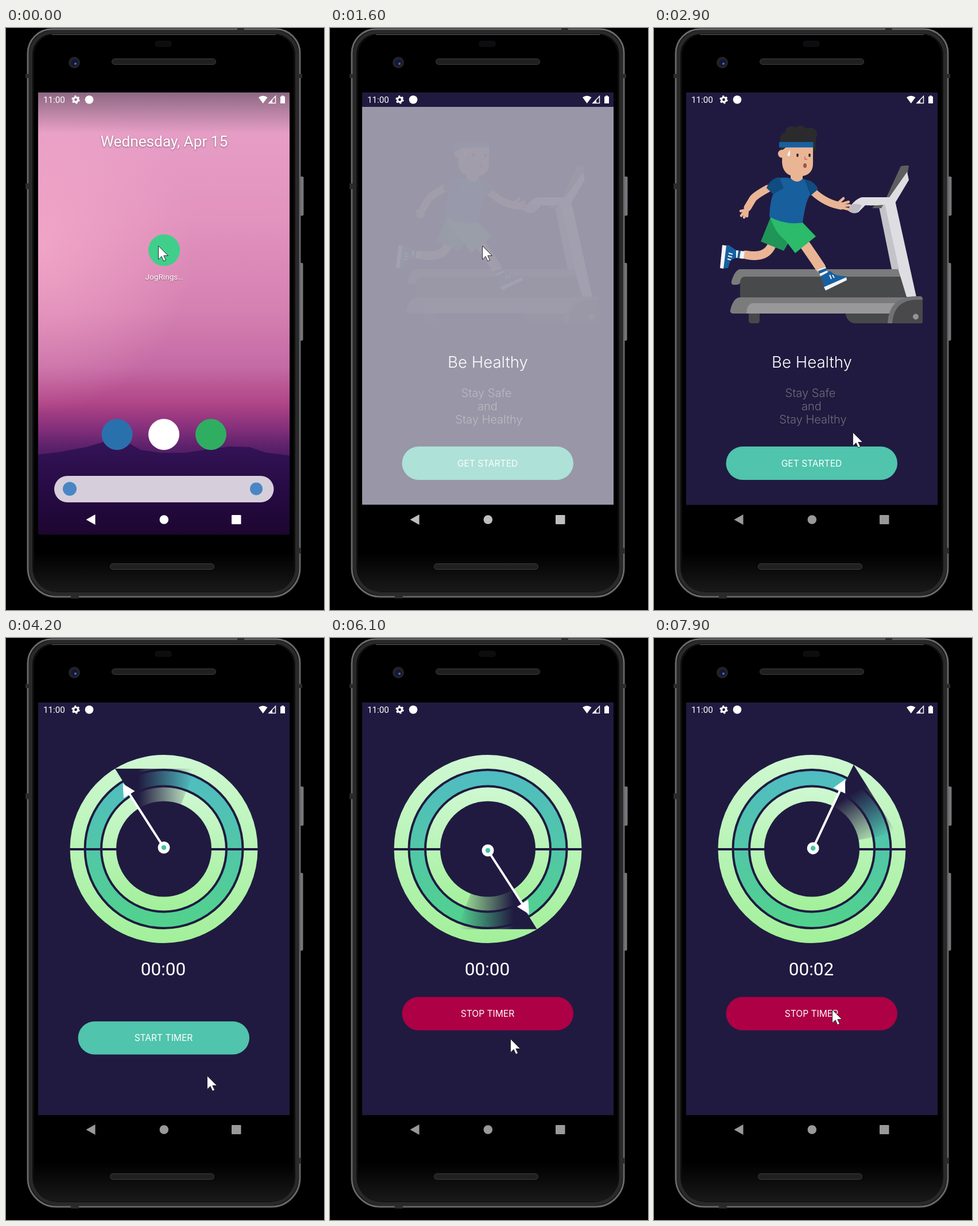
An HTML page that plays this animation: 554x1011 px, repeating every 8000 ms.

```html
<!DOCTYPE html>
<html lang="en">
<head>
<meta charset="utf-8">
<title>Workout timer</title>
<style>
html, body { margin: 0; width: 100%; height: 100%; overflow: hidden; background: #000; }
svg { display: block; width: 554px; height: 1011px; }
text { fill: #fff; font-family: Roboto, sans-serif; }
.mid { text-anchor: middle; }
.inter { font-family: Inter, sans-serif; text-anchor: middle; }
.label { font-size: 15.6px; font-weight: 400; }
.sub { font-size: 20px; font-weight: 300; fill: #716c77; }
.skin { fill: #eab595; }
.limb { fill: none; stroke: #eab595; stroke-linecap: round; stroke-linejoin: round; }
.navy { fill: #201a40; }
</style>
</head>
<body>
<svg viewBox="0 0 554 1011">
  <defs>
    <linearGradient id="sky" gradientUnits="userSpaceOnUse" x1="0" y1="112" x2="0" y2="740">
      <stop offset="0" stop-color="#e8a2c9"/><stop offset=".35" stop-color="#e293be"/>
      <stop offset=".6" stop-color="#d581b2"/><stop offset=".76" stop-color="#c46aa4"/>
      <stop offset=".86" stop-color="#b04587"/><stop offset=".93" stop-color="#842f7b"/>
      <stop offset=".98" stop-color="#5c216b"/><stop offset="1" stop-color="#531e66"/>
    </linearGradient>
    <radialGradient id="glow">
      <stop offset="0" stop-color="#f8aecb" stop-opacity=".7"/><stop offset="1" stop-color="#f8aecb" stop-opacity="0"/>
    </radialGradient>
    <linearGradient id="hills" x2="0" y2="1">
      <stop offset="0" stop-color="#351458"/><stop offset=".5" stop-color="#270b45"/><stop offset="1" stop-color="#1d0631"/>
    </linearGradient>
    <linearGradient id="shade" x2="0" y2="1">
      <stop offset="0" stop-color="#403848" stop-opacity=".55"/><stop offset="1" stop-color="#403848" stop-opacity="0"/>
    </linearGradient>
    <linearGradient id="mint" x2="0" y2="1"><stop stop-color="#cff8d2"/><stop offset="1" stop-color="#a2f09a"/></linearGradient>
    <linearGradient id="teal" x2="0" y2="1"><stop stop-color="#50bcc2"/><stop offset="1" stop-color="#52d28c"/></linearGradient>
    <linearGradient id="trail" gradientUnits="userSpaceOnUse" x1="190" y1="0" x2="325" y2="0">
      <stop offset=".3" stop-color="#201a40"/><stop offset="1" stop-color="#201a40" stop-opacity="0"/>
    </linearGradient>
    <linearGradient id="chin" x2="0" y2="1">
      <stop offset=".93" stop-color="#000"/><stop offset="1" stop-color="#191919"/>
    </linearGradient>
    <clipPath id="screen"><rect x="56" y="112" width="438" height="768"/></clipPath>
    <clipPath id="reveal"><rect id="revealBox" x="56" width="438" height="800"/></clipPath>
    <clipPath id="windowClip"><rect id="windowShape"/></clipPath>
  </defs>

  <rect width="554" height="1011"/>

  <!-- Phone body -->
  <g fill="#77777a">
    <rect x="511" y="258" width="7.5" height="68" rx="2"/>
    <rect x="511" y="408" width="6.5" height="135" rx="2"/>
  </g>
  <path d="M80 2H470A42 42 0 0 1 512 44V938A50 50 0 0 1 462 988H88A50 50 0 0 1 38 938V44A42 42 0 0 1 80 2Z"
    fill="#0d0d0e" stroke="#69696b" stroke-width="3"/>
  <path d="M82 7H468A39 39 0 0 1 507 46V936A47 47 0 0 1 460 983H90A47 47 0 0 1 43 936V46A39 39 0 0 1 82 7Z"
    fill="none" stroke="#29292a" stroke-width="6"/>
  <rect x="49" y="11" width="452" height="968" rx="36" fill="url(#chin)"/>
  <path d="M80 11.5H470" stroke="#666" fill="none"/>
  <path d="M37 80v7M37 270v10M513 80v7M510 903v10M403 3h12M113 988h14" stroke="#2b2b2c" stroke-width="6"/>
  <g fill="#202021" stroke="#3d3d3e">
    <rect x="184.5" y="53.5" width="181" height="10" rx="5"/>
    <rect x="181.5" y="930.5" width="181" height="10" rx="5"/>
  </g>
  <rect x="259" y="22" width="30" height="11" rx="5" fill="#0d0d10"/>
  <circle cx="119" cy="60" r="10" fill="#232326"/>
  <circle cx="119.5" cy="60.5" r="6" fill="#11183a"/>
  <circle cx="121" cy="62" r="2" fill="#5668a8"/>

  <g clip-path="url(#screen)">
    <rect x="56" y="111" width="439" height="769" fill="url(#sky)"/>
    <ellipse cx="56" cy="380" rx="270" ry="290" fill="url(#glow)"/>
    <path d="M56 741L90 737 140 728 180 716 210 719 235 733 270 738 310 738 350 732 390 727 425 728 450 737 495 743V880H56Z" fill="url(#hills)"/>

    <g id="home">
      <rect x="56" y="111" width="439" height="72" fill="url(#shade)"/>
      <text class="mid" x="275.5" y="206" font-size="26.2" style="text-shadow:0 1px 3px #0006">Wednesday, Apr 15</text>
      <circle cx="275.5" cy="386" r="27.5" fill="#3fcf8a"/>
      <text class="mid" x="275.5" y="437" font-size="13.6" style="text-shadow:0 1px 2px #0006">JogRings…</text>
      <circle cx="193.5" cy="706" r="27" fill="#2971ac"/>
      <circle cx="275" cy="706" r="27" fill="#fff"/>
      <circle cx="357" cy="706" r="27" fill="#2fae62"/>
      <rect x="84" y="778" width="382.5" height="46" rx="23" fill="#d6cfdb"/>
      <circle cx="111" cy="800.5" r="12" fill="#4a86c5"/>
      <circle cx="436" cy="800.5" r="11" fill="#4a86c5"/>
    </g>

    <g id="window" clip-path="url(#windowClip)">
      <rect x="56" y="111" width="439" height="769" fill="#fafafa"/>
      <rect id="windowTop" class="navy" x="56" width="439"/>
      <rect id="windowNav" x="56" width="439"/>
    </g>

    <g id="intro">
      <rect class="navy" x="56" y="111" width="439" height="717.5"/>
      <g id="runner">
        <!-- Treadmill -->
        <path d="M150 419H432V433H157Q152 433 151 440 150 446 143 446H139Q134 446 135 440 141 420 150 419Z" fill="#7b7b7c"/>
        <path d="M157 432H445V470H150V441Q151 433 157 432Z" fill="#48494b"/>
        <path d="M391 306L420 300 457 467H440Z" fill="#dedee2"/>
        <path d="M391 306L402 305 427 419H414Z" fill="#c3c3c9"/>
        <path d="M165 494H184V508Q184 513 179 513H170Q165 513 165 508Z" fill="#47484a"/>
        <path d="M333 494H430V513H350Q336 512 333 494Z" fill="#47484a"/>
        <path d="M149 468H440V496H138Q132 496 133 490 138 469 149 468Z" fill="#7b7b7c"/>
        <path d="M171 478H430V496H161Q162 480 171 478Z" fill="#98989a"/>
        <path d="M407 513Q409 468 453 466H463Q468 466 468 471V509Q468 513 464 513Z" fill="#717173"/>
        <path d="M415 513Q418 472 458 472H468V509Q468 513 464 513Z" fill="#49494b"/>
        <circle cx="456" cy="501.5" r="5" fill="#949496"/>
        <path d="M380 313L386 306H400L396 313ZM430 240L436 239H444L442 252 413 300 405 294Z" fill="#5e5e60"/>
        <path d="M337 316Q350 297 362 294H410L441 250 444 264 420 304Q400 309 368 308L356 320Q346 324 337 316Z" fill="#dedee2"/>
        <path d="M337 316L346 306Q358 304 362 309L354 321Q345 324 337 316Z" fill="#bcbcc2"/>
        <!-- Legs -->
        <path class="limb" d="M205 378Q194 401 160 394" stroke-width="15"/>
        <path d="M142 386L158 388 156 401 141 399Z" fill="#f4f4f6"/>
        <path d="M147 387h4l-2 13h-4Z" fill="#17609f"/>
        <path d="M123 378L130 377 143 386 143 399 133 404 129 417 117 418Z" fill="#17609f"/>
        <path d="M119 377L126 378 121 418 115 417Z" fill="#f4f4f6"/>
        <path d="M130 391l7 2M129 396l7 2M128 401l6 2" stroke="#f4f4f6" stroke-width="2"/>
        <path d="M203 329L186 371 226 387 242 360Z" fill="#1f9657"/>
        <path class="limb" d="M264 378Q278 398 290 416" stroke-width="18"/>
        <path d="M285 420L299 415 303 425 290 431Z" fill="#f4f4f6"/>
        <path d="M286 422l14-5 2 4-14 6Z" fill="#17609f"/>
        <path d="M291 431L307 422Q316 432 334 431L336 437 298 455Z" fill="#17609f"/>
        <path d="M296 450L335 433 336 438 299 456Z" fill="#f4f4f6"/>
        <path d="M306 429l3 7M311 429l3 5" stroke="#f4f4f6" stroke-width="2"/>
        <path d="M202 327Q230 341 258 337L282 362 246 391 229 369Q210 355 202 327Z" fill="#2bbb6b"/>
        <!-- Arms and torso -->
        <path class="limb" d="M198 279Q176 291 172 297L163 312" stroke-width="13"/>
        <path class="limb" d="M160 316L151 318M159 317L152 326M160 318L157 329M163 317L162 327" stroke-width="4.5"/>
        <path class="limb" d="M278 285Q300 305 326 309" stroke-width="13"/>
        <path class="limb" d="M322 303L330 296M326 306L339 302M328 309L341 308M327 312L339 315" stroke-width="4.5"/>
        <path d="M205 266Q222 256 240 262 250 268 260 262 278 268 284 278L272 290Q264 300 259 338 230 343 201 328 202 300 208 288Z" fill="#185f9e"/>
        <path d="M196 278Q202 262 218 259L226 278 208 289ZM262 263Q279 265 286 280L273 291Z" fill="#104c80"/>
        <path class="skin" d="M238 248H259V262Q249 272 238 261Z"/>
        <!-- Head -->
        <g fill="#2b2b2d">
          <circle cx="239" cy="181" r="10.5"/><circle cx="255" cy="182" r="12.5"/><circle cx="272" cy="185" r="12"/>
          <circle cx="229" cy="191" r="9"/><rect x="220" y="188" width="62" height="26" rx="4"/>
        </g>
        <path class="skin" d="M224 212L230 207H277V235Q277 258 250 258 224 258 223 232Z"/>
        <circle class="skin" cx="223" cy="218.5" r="7"/>
        <rect x="218" y="198" width="59.5" height="9.5" fill="#17609f"/>
        <path d="M237 212q-6 7-4 10 3 2 4-2Z" fill="#f4f6fa"/>
        <ellipse cx="250" cy="221" rx="1.8" ry="3" fill="#26262a"/>
        <ellipse cx="271" cy="221" rx="1.8" ry="3" fill="#26262a"/>
        <path d="M263 223v5h4" fill="none" stroke="#d37b72" stroke-width="2"/>
        <ellipse cx="263" cy="239" rx="3" ry="4" fill="#9c544c"/>
      </g>
      <text class="inter" x="275" y="590" font-size="27.6" font-weight="300">Be Healthy</text>
      <text class="inter sub" x="272.5" y="641">Stay Safe</text>
      <text class="inter sub" x="274.5" y="664">and</text>
      <text class="inter sub" x="277" y="687">Stay Healthy</text>
      <rect x="125.5" y="727" width="298.5" height="58" rx="29" fill="#50c4ac"/>
      <text class="inter label" x="274.5" y="762">GET STARTED</text>
    </g>

    <g clip-path="url(#reveal)">
      <rect class="navy" x="56" y="111" width="439" height="717.5"/>
      <g id="timer">
        <circle cx="275" cy="366.5" r="163.5" fill="url(#mint)"/>
        <circle class="navy" cx="275" cy="366.5" r="139.5"/>
        <circle cx="275" cy="366.5" r="135.5" fill="url(#teal)"/>
        <circle class="navy" cx="275" cy="366.5" r="111"/>
        <circle cx="275" cy="366.5" r="107" fill="url(#mint)"/>
        <circle class="navy" cx="275" cy="366.5" r="83"/>
        <rect class="navy" x="110" y="365" width="330" height="4"/>
        <g id="hand">
          <path d="M190 227H330L275 364Z" fill="url(#trail)"/>
          <path d="M275 364L212 266" stroke="#fff" stroke-width="4"/>
          <path d="M203.5 253L224.5 266 205 278Z" fill="#fff"/>
          <circle cx="275" cy="364" r="10.5" fill="#fff"/>
          <circle cx="275" cy="364" r="4.3" fill="#45c2a8"/>
        </g>
        <text id="clock" class="mid" x="274" y="586" font-size="31.5">00:00</text>
        <g id="start">
          <rect x="125.5" y="666" width="298.5" height="57.5" rx="28.75" fill="#50c4ac"/>
          <text class="inter label" x="274.5" y="700">START TIMER</text>
        </g>
        <g id="stop">
          <rect x="125.5" y="623.5" width="298.5" height="58" rx="29" fill="#ae0045"/>
          <text class="inter label" x="274.5" y="658">STOP TIMER</text>
        </g>
      </g>
    </g>

    <!-- Status bar -->
    <text x="65" y="130" font-size="15.2">11:00</text>
    <circle cx="121.5" cy="124.5" r="4" fill="none" stroke="#fff" stroke-width="3.2"/>
    <circle cx="121.5" cy="124.5" r="6.2" fill="none" stroke="#fff" stroke-width="2" stroke-dasharray="3.2 3.29"/>
    <circle cx="145" cy="124.5" r="7.3" fill="#fff"/>
    <path d="M440 120.5Q447.5 115 455.5 120.5L447.7 131Z" fill="#fff"/>
    <path d="M458 130.5L469.5 118.5V130.5Z" fill="none" stroke="#fff" stroke-width="1.4"/>
    <path d="M458 131L464 124.5V131Z" fill="#fff"/>
    <path d="M478 119h2v-1.5h4v1.5h2v12h-8Z" fill="#fff"/>
    <g id="nav">
      <path d="M139.5 854L155.5 845V863Z"/><circle cx="275.3" cy="854" r="7.8"/>
      <rect x="393" y="846" width="16.5" height="16" rx="1"/>
    </g>
  </g>
  <path id="cursor" d="M.5 .5V24L6 18.7 9.7 27 13.5 25.3 9.8 17.5H17.5Z" fill="#fff" stroke="#2a2a30"/>
</svg>
<script>
const LOOP = 8000, STEP = 100;
const SPIN_START = 5372, SPIN_TIME = 1455;
const $ = id => document.getElementById(id);
const set = (id, attrs) => { for (const k in attrs) $(id).setAttribute(k, attrs[k]); };
const lerp = (a, b, p) => a + (b - a) * p;
const part = (t, from, to) => Math.min(1, Math.max(0, (t - from) / (to - from)));
const easeOut = p => 1 - (1 - p) ** 3;
const easeInOut = p => (1 - Math.cos(Math.PI * p)) / 2;

// time, x, y
const cursorPath = [
  [0, 265, 378], [1900, 265, 378], [2700, 346, 702], [2900, 346, 702], [3200, 338, 742], [3600, 338, 742],
  [4000, 350, 760], [4600, 350, 760], [5200, 314, 690], [5400, 314, 690], [5700, 314, 696],
  [7300, 314, 696], [7900, 310, 645], [8000, 310, 645]
];

function drawCursor(t) {
  const i = cursorPath.findIndex(k => k[0] > t);
  const [t0, x0, y0] = cursorPath[i - 1], [t1, x1, y1] = cursorPath[i];
  const p = easeInOut(part(t, t0, t1));
  set('cursor', { transform: `translate(${lerp(x0, x1, p)} ${lerp(y0, y1, p)})` });
}

function drawLaunch(t) {
  const p = easeOut(part(t, 100, 600));
  const width = lerp(54, 439, p), height = lerp(54, 769, p ** 1.15);
  const top = lerp(386, 495.5, Math.min(1, p * 1.2)) - height / 2;
  const navHeight = 52 * p ** 5;
  set('home', { opacity: Math.max(0, 1 - 2 * p) });
  set('window', { opacity: Math.min(1, 3 * p) });
  set('windowShape', { x: 275.5 - width / 2, y: top, width, height, rx: 27 * Math.sqrt(1 - p) });
  set('windowTop', { y: top, height: 26 * width / 439 });
  set('windowNav', { y: top + height - navHeight, height: navHeight });
}

function drawIntro(t) {
  set('intro', { opacity: part(t, 1400, 1853) });
  set('runner', { opacity: easeInOut(part(t, 1300, 2700)) });
  const grey = Math.round(lerp(255, 153, part(t, 1400, 1720)));
  set('nav', { fill: `rgb(${grey},${grey},${grey})` });
}

function drawTimer(t) {
  const shown = easeOut(part(t, 3650, 4100));
  set('revealBox', { y: lerp(880, 111, shown) });
  set('timer', { transform: `translate(0 ${lerp(28, 0, shown)})` });

  const elapsed = Math.max(0, t - SPIN_START);
  const turn = easeInOut(elapsed / SPIN_TIME % 1);
  set('hand', { transform: `rotate(${-360 * turn} 275 366.5)` });
  $('clock').textContent = '00:0' + Math.floor(elapsed / 1000);

  const swap = easeInOut(part(t, 5400, 5700));
  set('start', { opacity: 1 - swap });
  set('stop', { opacity: swap, transform: `translate(0 ${lerp(32, 0, swap)})` });
}

function frame() {
  const t = Math.floor(performance.now() % LOOP / STEP) * STEP;
  drawLaunch(t);
  drawIntro(t);
  drawTimer(t);
  drawCursor(t);
  requestAnimationFrame(frame);
}
frame();
</script>
</body>
</html>
```
